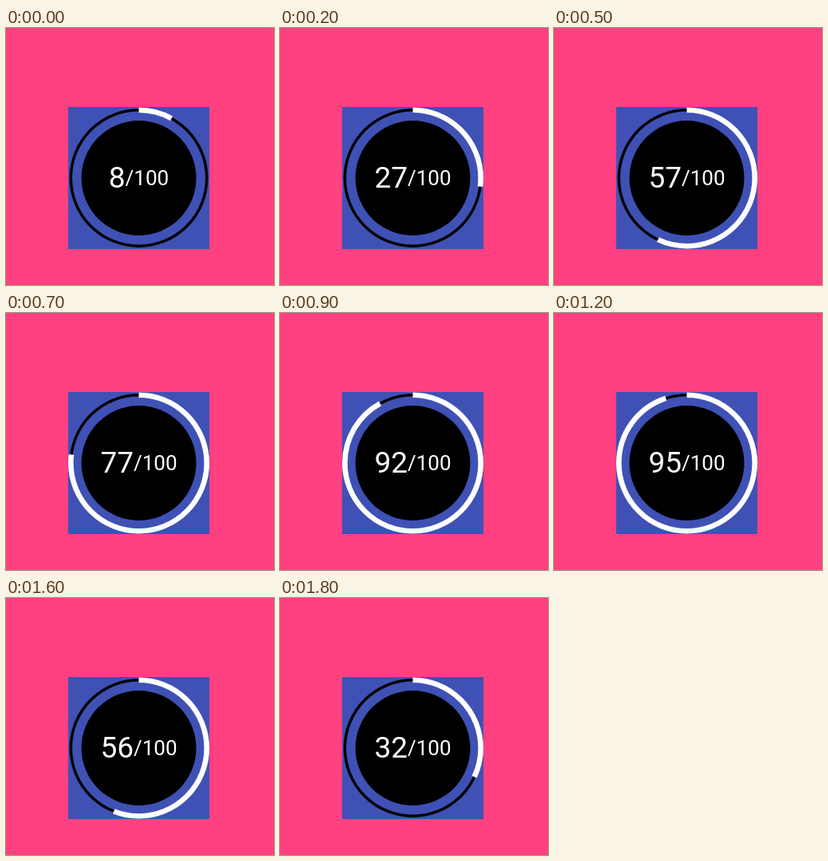
These frames come from a looping animation (336 by 322 pixels, 2.4 s). An HTML page:

```html
<!DOCTYPE html>
<html lang="en">
<head>
<meta charset="utf-8">
<title>Circular progress</title>
<style>
  html, body { margin: 0; width: 100%; height: 100%; overflow: hidden; background: #ff4081; }
  svg { display: block; width: 336px; height: 322px; }
  circle { fill: none; }
  text { font-family: Roboto, sans-serif; font-size: 37px; fill: #fff; text-anchor: middle; }
  .unit { font-size: 26px; }
</style>
</head>
<body>
<svg viewBox="0 0 336 322">
  <rect width="336" height="322" fill="#ff4081"/>
  <rect x="78" y="99" width="177" height="178" fill="#3f51b5"/>
  <g transform="translate(166.5 188)">
    <circle r="72" style="fill:#000"/>
    <circle r="85.2" stroke="#000" stroke-width="3.5"/>
    <circle id="bar" r="85.2" stroke="#fff" stroke-width="6.6" pathLength="100"
            stroke-dasharray="8 100" transform="rotate(-90)"/>
    <text y="12"><tspan id="count">8</tspan><tspan class="unit" dy="-3">/100</tspan></text>
  </g>
</svg>
<script>
  const LOOP = 2400, STEP = 100;
  // Rises to 100, rests one step, falls back and holds the last value.
  const values = [8, 17, 27, 37, 47, 57, 67, 77, 85, 92, 100, 100, 95, 88, 79, 68, 56, 44, 32];
  const bar = document.getElementById('bar');
  const count = document.getElementById('count');
  let shown = 8;

  function draw() {
    const step = Math.floor(performance.now() % LOOP / STEP);
    const value = values[Math.min(step, values.length - 1)];
    if (value !== shown) {
      shown = value;
      count.textContent = value;
      bar.setAttribute('stroke-dasharray', `${value} 100`);
    }
    requestAnimationFrame(draw);
  }
  draw();
</script>
</body>
</html>
```
